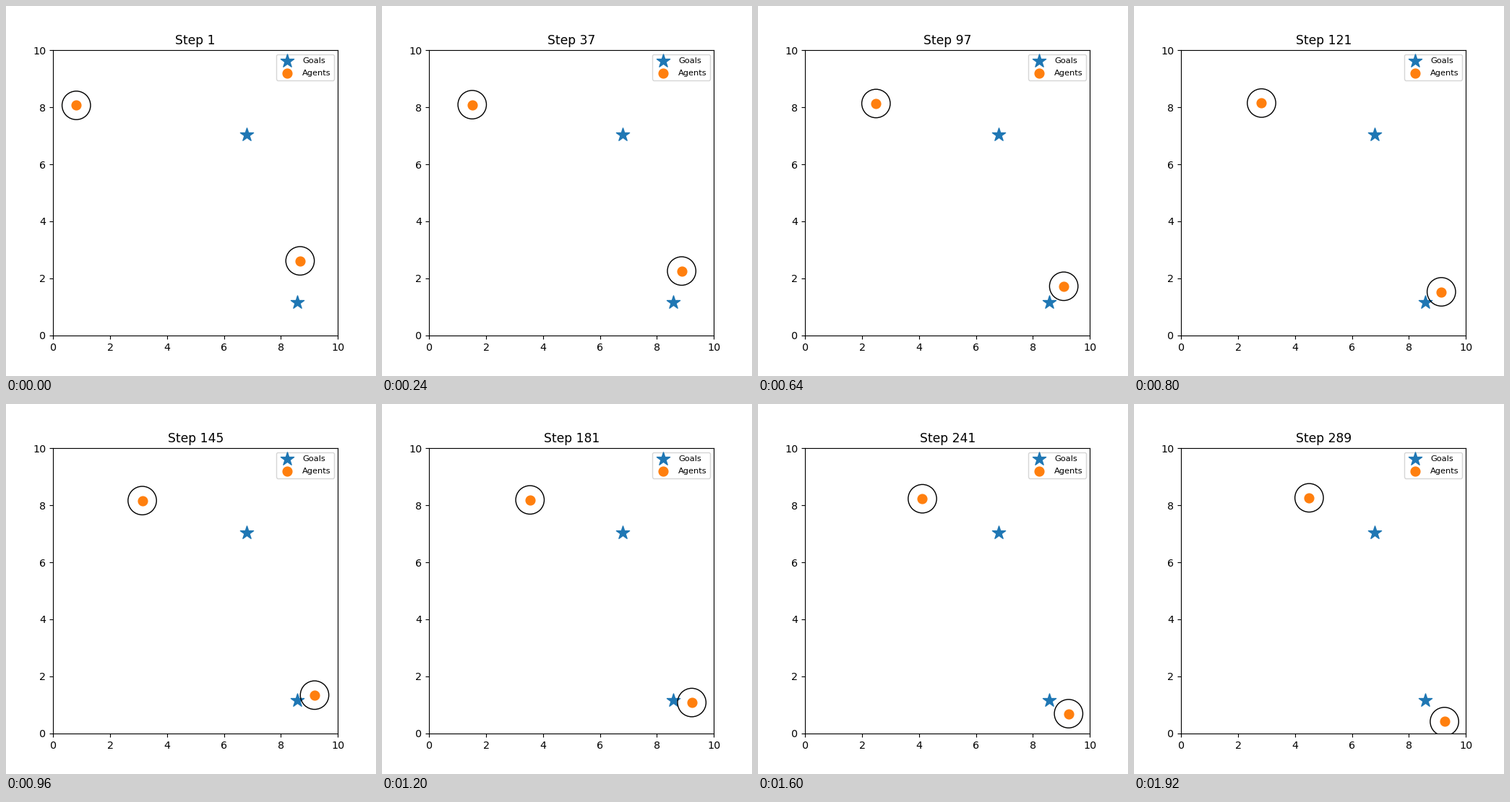
A matplotlib script that plays this animation: 512 by 512 pixels, repeating every 2000 ms.

```python
import numpy as np
import matplotlib.pyplot as plt
from matplotlib.animation import FuncAnimation

FRAMES, INTERVAL, STRIDE = 25, 80, 12
GOALS = np.array([[6.805, 7.05], [8.572, 1.163]])


def approach(i, start, reach, rate):
    """Exponential slow-down from start towards start + reach."""
    return start + reach * (1 - np.exp(-rate * i))


def swing(i, start, height, peak):
    """Rise that levels off at the peak time, then falls back slowly."""
    return start + height * i / peak * np.exp(1 - i / peak)


def positions(i):
    left = approach(i, 0.812, 5.647, 0.044), 8.071 + 0.0081 * i
    right = swing(i, 8.672, 0.58, 21), approach(i, 2.613, -4.717, 0.0262)
    return np.array([left, right])


fig = plt.figure(figsize=(5, 5), dpi=102.4)
ax = fig.add_axes([0.1275, 0.11, 0.7695, 0.77], xlim=(0, 10), ylim=(0, 10))
start = positions(0)
ax.scatter(*GOALS.T, marker="*", s=180, color="tab:blue",
           snap=False, label="Goals")
agents = ax.scatter(*start.T, s=80, color="tab:orange",
                    snap=False, label="Agents")
rings = [ax.add_patch(plt.Circle(p, 0.5, fill=False, color="black"))
         for p in start]
ax.legend(loc="upper right", fontsize=8, labelspacing=0.62,
          borderaxespad=0.45)
title = ax.set_title("Step 1")


def update(i):
    pos = positions(i)
    agents.set_offsets(pos)
    for ring, p in zip(rings, pos):
        ring.center = p
    title.set_text(f"Step {1 + STRIDE * i}")
    return [agents, title, *rings]


anim = FuncAnimation(fig, update, frames=FRAMES, interval=INTERVAL,
                     repeat=True, repeat_delay=0)
plt.show()
```
